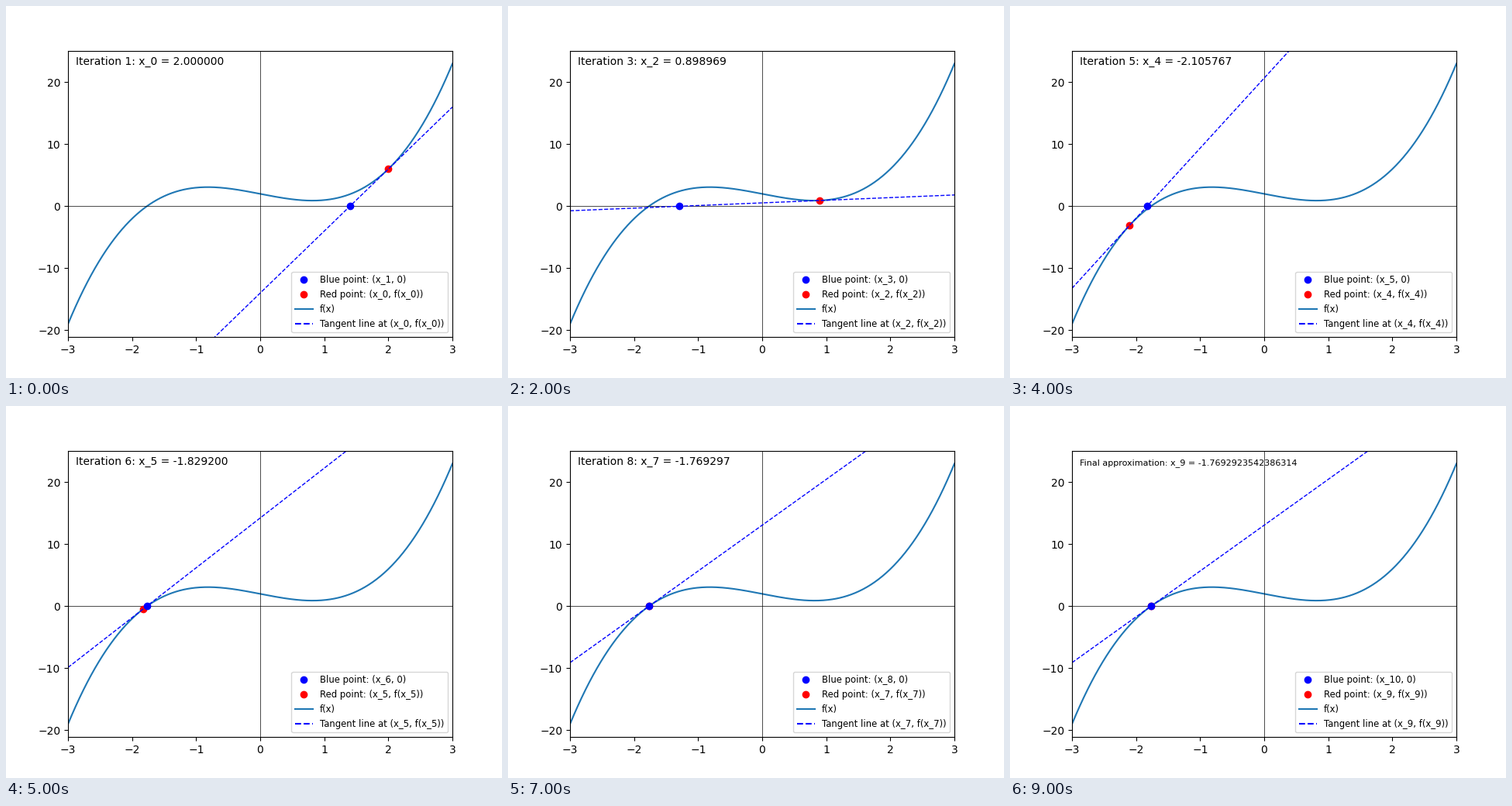
A matplotlib script that plays this animation: 640 by 480 pixels, repeating every 10 s.

```python
import numpy as np
import matplotlib.pyplot as plt
from matplotlib.animation import FuncAnimation
from matplotlib.lines import Line2D

STEPS = 10


def f(x):
    return x**3 - 2 * x + 2


def slope(x):
    return 3 * x**2 - 2


# Newton's method, starting from x = 2
guesses = [2.0]
for _ in range(STEPS):
    x = guesses[-1]
    guesses.append(x - f(x) / slope(x))

plt.rcParams["font.family"] = "DejaVu Sans"
fig, ax = plt.subplots(figsize=(6.4, 4.8), dpi=100)
xs = np.linspace(-3, 3, 400)
ax.plot(xs, f(xs), color="tab:blue", lw=1.5)
ax.axhline(0, color="black", lw=0.5)
ax.axvline(0, color="black", lw=0.5)
ax.set_xlim(-3, 3)
ax.set_ylim(-21.1, 25.1)

red, = ax.plot([], [], "ro")
tangent, = ax.plot([], [], "b--", lw=1)
blue, = ax.plot([], [], "bo")
label = ax.text(0.02, 0.95, "", transform=ax.transAxes)


def dot(color):
    return Line2D([], [], marker="o", ls="", color=color)


handles = [
    dot("blue"),
    dot("red"),
    Line2D([], [], color="tab:blue"),
    Line2D([], [], color="blue", ls="--"),
]


def draw(i):
    x, nxt = guesses[i], guesses[i + 1]
    red.set_data([x], [f(x)])
    blue.set_data([nxt], [0])
    tangent.set_data(xs, f(x) + slope(x) * (xs - x))
    if i < STEPS - 1:
        label.set_text(f"Iteration {i + 1}: x_{i} = {x:.6f}")
        label.set_fontsize(10)
    else:
        label.set_text(f"Final approximation: x_{i} = {x}")
        label.set_fontsize(8)
    point = f"(x_{i}, f(x_{i}))"
    names = [
        f"Blue point: (x_{i + 1}, 0)",
        f"Red point: {point}",
        "f(x)",
        f"Tangent line at {point}",
    ]
    ax.legend(handles, names, loc="lower right", fontsize="small")
    return red, tangent, blue, label


anim = FuncAnimation(fig, draw, frames=STEPS, interval=1000, repeat=True,
                     repeat_delay=0, init_func=lambda: draw(0))
plt.show()
```
